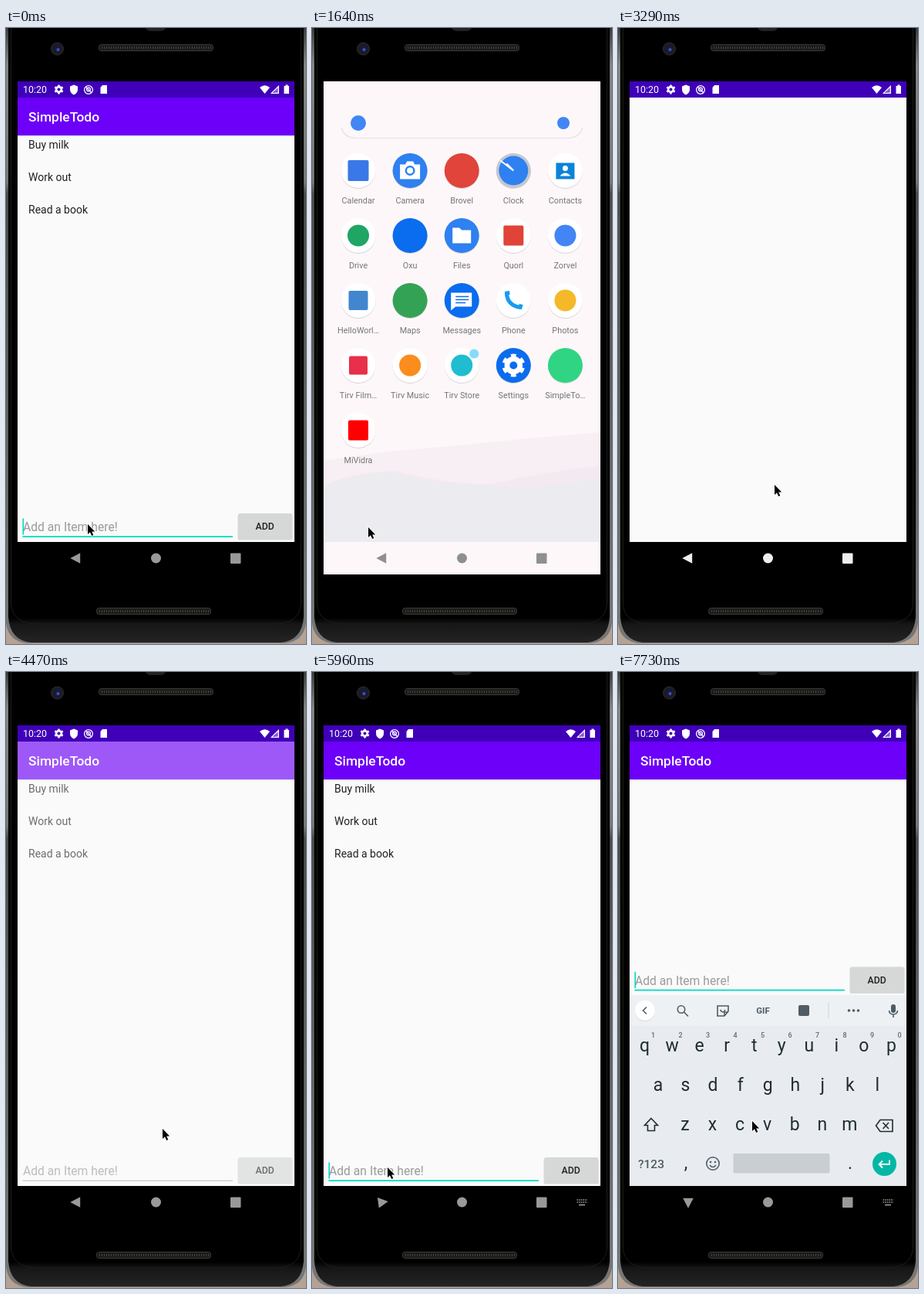
An HTML page that plays this animation: 389 by 797 pixels, repeating every 8 s.

```html
<!DOCTYPE html>
<html lang="en">
<head>
<meta charset="utf-8">
<title>Todo app on a phone</title>
<style>
html, body { margin: 0; width: 100%; height: 100%; overflow: hidden; background: #000; }
svg { display: block; width: 389px; height: 797px; font-family: Roboto, sans-serif; }
.mid { text-anchor: middle; }
.medium { font-weight: 500; }
.line { fill: none; stroke: #4f5c63; stroke-width: 1.6; }
</style>
</head>
<body>
<svg viewBox="0 0 389 797">
  <defs>
    <clipPath id="screen"><path d="M15 69H374V707H15Z"/></clipPath>
    <linearGradient id="edge" x2="0" y2="1">
      <stop stop-color="#3a3a3a"/><stop offset=".06" stop-color="#858585"/>
      <stop offset=".25" stop-color="#777"/><stop offset=".27" stop-color="#4a4a4a"/>
      <stop offset="1" stop-color="#777"/>
    </linearGradient>
    <linearGradient id="lip" x2="0" y2="1">
      <stop offset=".96" stop-color="#000"/><stop offset=".97" stop-color="#161616"/><stop offset="1" stop-color="#242424"/>
    </linearGradient>
  </defs>

  <g id="phone">
    <path fill="#b5a293" d="M0 740H389V797H0Z"/>
    <path fill="url(#edge)" d="M0 0H389V770Q386 794 361 796H28Q3 794 0 770Z"/>
    <path fill="url(#lip)" d="M3 0H386V762Q384 792 357 795H32Q5 792 3 762Z"/>
    <path fill="none" stroke="#1d1d1d" d="M6.500 0V745Q8 771 42 771H347Q381 771 382.500 745V0"/>
    <path fill="#222" d="M181 0H207Q205 4 200 4H188Q183 4 181 0Z"/>
    <g fill="#1b1b1a" stroke="#3b3a36">
      <rect x="120.500" y="21.500" width="148" height="8" rx="3"/>
      <rect x="117.500" y="750.500" width="148" height="8" rx="3"/>
    </g>
    <path stroke="#45443f" stroke-width="3" stroke-dasharray="1 2" d="M124 25.500H266M121 754.500H263"/>
    <circle cx="66.500" cy="27" r="8" fill="#1c1c20" stroke="#2d2d30"/>
    <circle cx="67" cy="27" r="4.500" fill="#151a45"/>
    <circle cx="67.500" cy="28" r="2" fill="#3d56b0"/>
  </g>

  <g clip-path="url(#screen)">
    <g id="launcher">
      <path fill="#fdf7f9" d="M15 69H374V707H15Z"/>
      <path fill="#f7eff3" d="M15 560L90 549 180 541 260 533 374 523V665H15Z"/>
      <path fill="#f2eaf0" d="M15 592Q50 575 110 573Q170 590 230 590Q300 575 374 566V665H15Z"/>
      <path fill="#ecebf0" d="M15 592Q60 576 105 575Q160 592 220 591Q290 600 374 582V665H15Z"/>
      <path fill="none" stroke="#e6e0e3" stroke-width="1.200" d="M38 129Q42 142 57 142.500H332Q347 142 351 129"/>
      <circle cx="60" cy="123" r="10" fill="#4285f4"/>
      <circle cx="326" cy="123" r="8" fill="#4285f4"/>
    </g>

    <g id="win">
      <path fill="#fafafa" d="M15 69H374V707H15Z"/>
      <g id="content">
        <g id="list" font-size="14" fill="#212121">
          <text x="29" y="156">Buy milk</text>
          <text x="29" y="198">Work out</text>
          <text x="29" y="239.500">Read a book</text>
        </g>
        <g id="entry">
          <text x="22" y="651" font-size="15.700" fill="#9b9b9b">Add an Item here!</text>
          <path id="rule" d="M21.500 658.200H294"/>
          <path id="caret" stroke="#03dac5" stroke-width="1.700" d="M22.300 634.500V655.500"/>
          <rect x="300.500" y="629.500" width="71" height="33" rx="2" fill="#000" opacity=".14"/>
          <rect x="301" y="628" width="70" height="33" rx="2" fill="#d6d7d7"/>
          <text class="mid medium" x="335.700" y="649" font-size="12.300" fill="#212121">ADD</text>
        </g>
        <path fill="#000" opacity=".1" d="M15 139H374V140.500H15Z"/>
        <path fill="#6c00f8" d="M15 90H374V139H15Z"/>
      </g>
      <text id="title" class="medium" x="29" y="121" font-size="17.400" fill="#fff">SimpleTodo</text>
      <g id="keys">
        <path fill="#e8ecf0" d="M15 418H374V707H15Z"/>
        <path fill="#eef1f4" d="M15 418H374V458H15Z"/>
        <circle cx="35" cy="439" r="13" fill="#d5dadd"/>
        <circle cx="35" cy="438" r="13" fill="#fff"/>
        <g class="line">
          <path d="M37 433.500L32.500 438 37 442.500"/>
          <circle cx="82" cy="436.500" r="4.700"/><path d="M85.500 440L91 445.500"/>
          <path d="M129 432H143V439L138 445H129ZM138 445V440H143M132.500 437Q136 443 139 437"/>
          <path stroke="#cdd3d7" stroke-width="1" d="M273 428V448"/>
          <path d="M351.500 438Q352 443 357 443Q362 443 362.500 438M357 443V447"/>
          <path stroke="#202c33" d="M43 577.500L51.500 586.500H47.500V593.500H38.500V586.500H34.500Z"/>
          <path stroke="#202c33" d="M334.500 587L340 579.500H356V594.500H340ZM343.500 583L351 591M351 583L343.500 591"/>
          <circle cx="123" cy="636" r="8.200"/><path d="M119 638Q123 643 127 638"/>
        </g>
        <g fill="#4f5c63">
          <rect x="234" y="431" width="14" height="14" rx="2"/>
          <rect x="354" y="430" width="6" height="11" rx="3"/>
          <circle cx="299.500" cy="438" r="1.800"/><circle cx="305.500" cy="438" r="1.800"/><circle cx="311.500" cy="438" r="1.800"/>
          <circle cx="120" cy="634" r="1.300"/><circle cx="126" cy="634" r="1.300"/>
          <text class="mid" x="188" y="442" font-size="11.500" font-weight="700">GIF</text>
          <text class="medium" x="26" y="642" font-size="15.500">?123</text>
        </g>
        <rect x="149.500" y="623" width="125" height="25.500" rx="2" fill="#c9ced2"/>
        <circle cx="345.500" cy="636.500" r="15.500" fill="#00b8a5"/>
        <path fill="none" stroke="#fff" stroke-width="1.800" d="M352 631.500V637H339M343 632.500L338.500 637 343 641.500"/>
      </g>
      <path d="M15 665H374V707H15Z"/>
      <path fill="#3f00b8" d="M15 69H374V90H15Z"/>
      <g id="status" fill="#fff">
        <text x="22" y="84" font-size="12.400">10:20</text>
        <path d="M88 73.500L93 75.500V79.500Q93 84 88 86.500Q83 84 83 79.500V75.500Z"/>
        <g fill="none" stroke="#fff" stroke-width="1.300">
          <circle cx="107" cy="80" r="5.400"/><circle cx="107" cy="79.500" r="2.400"/><path d="M104 76.500L111 84"/>
          <path d="M344.500 84.300H353.300V75.500Z"/>
        </g>
        <path d="M125 74H131V85H122.500V77Z"/>
        <path d="M329 77Q335.500 71.500 342 77L335.500 85Z"/>
        <path d="M348 84.500V81L353.500 75.500V84.500Z" opacity=".35"/>
        <path d="M360.500 75H362.500V73.500H365.500V75H367V85H360.500Z"/>
      </g>
    </g>

    <g id="nav">
      <path id="back" d="M83.300 686L96.200 679.200V692.800Z"/>
      <circle cx="194.500" cy="686" r="6.500"/>
      <rect x="291" y="679.500" width="13.500" height="13.500" rx="1"/>
      <g id="imeKey" fill="none" stroke="#999" stroke-width="1.600">
        <path stroke-dasharray="1.600 1" d="M343.500 683H357M343.500 686H357"/><path d="M346 689.500H354"/>
      </g>
    </g>
  </g>
  <g id="mouse">
    <path transform="translate(1 1) scale(.87)" d="M0 0V15L3.400 11.800 6 17.300 8.400 16.200 6 11H10.600Z" stroke="#fff" stroke-width="1.600" paint-order="stroke"/>
  </g>
</svg>
<script>
const $ = id => document.getElementById(id);
const add = (id, markup) => $(id).insertAdjacentHTML('beforeend', markup);
const set = (id, attrs) => { for (const k in attrs) $(id).setAttribute(k, attrs[k]); };

const disc = (r, c) => `<circle r="${r}" fill="${c}"/>`;
const square = (s, c) => `<rect x="${-s / 2}" y="${-s / 2}" width="${s}" height="${s}" rx="2" fill="${c}"/>`;
const shape = (d, c = '#fff') => `<path d="${d}" fill="${c}"/>`;
const stroke = (d, c = '#fff', w = 2) => `<path d="${d}" fill="none" stroke="${c}" stroke-width="${w}"/>`;
const gear = (r, c) => `<g fill="none" stroke="${c}"><circle r="${r * .56}" stroke-width="${r * .45}"/>
  <circle r="${r * .83}" stroke-width="${r * .34}" pathLength="12" stroke-dasharray="1 1" stroke-dashoffset="-.5"/></g>`;
const white = '#fff', blue = '#2f80f0', deep = '#0a6cee';

// label, tile colour, drawing on the tile
const apps = [
  ['Calendar', white, square(27, '#3b78e7')],
  ['Camera', blue, shape('M-13 -8H-6L-4 -12H4L6 -8H13V11H-13Z') + disc(6.5, blue) + disc(4, white)],
  ['Brovel', '#e0443a', ''],
  ['Clock', '#c3c8ce', disc(19, blue) + stroke('M-17 -13L0 0M-9 -9L0 0')],
  ['Contacts', white, shape('M-12 -10H12V11H-12Z', '#0b83d9') + `<g fill="#fff"><circle cy="-3" r="3.5"/><path d="M-7 7Q0 -1 7 7Z"/></g>`],
  ['Drive', white, disc(14, '#20a565')],
  ['Oxu', deep, ''],
  ['Files', blue, shape('M-12 -10H-3L0 -7H12V10H-12Z')],
  ['Quorl', white, square(26, '#e04438')],
  ['Zorvel', white, disc(14, '#4285f4')],
  ['HelloWorl…', white, square(25, '#4286d0')],
  ['Maps', '#34a255', ''],
  ['Messages', deep, shape('M-14 -10H13V8H-8L-14 13Z') + stroke('M-8 -5H9M-8 -1H9M-8 3H5', deep, 1.6)],
  ['Phone', white, stroke('M-9 -10Q-8 7 9 9', '#1a9bf0', 5) + stroke('M-11 -9L-5 -10M8 11L10 5', '#1a9bf0', 5)],
  ['Photos', white, disc(14, '#f4b929')],
  ['Tirv Film…', white, square(24, '#e8304a')],
  ['Tirv Music', white, disc(14, '#fb8c1e')],
  ['Tirv Store', white, disc(14, '#20bcd0') + `<circle cx="16" cy="-15" r="6" fill="#83dcfb"/>`],
  ['Settings', deep, gear(15, white)],
  ['SimpleTo…', '#2fd583', ''],
  ['MiVidra', white, square(26, '#f00')],
];
apps.forEach(([name, tile, art], i) => {
  const x = 60 + i % 5 * 67.1, y = 184.5 + Math.floor(i / 5) * 84;
  add('launcher', `<g transform="translate(${x} ${y})"><circle cy="1" r="22.5" fill="#d9d3d6"/>
    ${disc(22.5, tile)}${art}<text class="mid" y="42.500" font-size="10.8" fill="#757575">${name}</text></g>`);
});

add('status', `<g transform="translate(68.5 79.5)">${gear(6, white)}</g>`);

const letters = (row, x, y) => [...row].forEach((c, i) =>
  add('keys', `<text class="mid" x="${x + i * 35.55}" y="${y}" font-size="23" fill="#202c33">${c}</text>`));
letters('qwertyuiop', 34.5, 491);
letters('asdfghjkl', 52, 542);
letters('zxcvbnm', 87, 593);
letters(',', 88, 643);
letters('.', 301, 643);
[...'1234567890'].forEach((c, i) =>
  add('keys', `<text class="mid medium" x="${45.5 + i * 35.5}" y="473" font-size="9" fill="#5f6b72">${c}</text>`));

// Linear keyframes: [tick, value, value...]
function track(keys, n) {
  let i = 0;
  while (i < keys.length - 1 && keys[i + 1][0] <= n) i++;
  const a = keys[i], b = keys[i + 1] || a;
  const k = b === a ? 0 : Math.max(0, (n - a[0]) / (b[0] - a[0]));
  return a.slice(1).map((v, j) => v + (b[j + 1] - v) * k);
}
const mousePath = [[0, 105, 641], [1, 72, 645], [14, 72, 645], [18, 114, 645], [20, 160, 618], [21, 160, 618],
  [22, 202, 590], [34, 202, 590], [37, 97, 640], [44, 97, 640], [45, 140, 612], [46, 173, 580]];
// window scale and opacity
const windowPath = [[5, 1, 1], [6, .99, .92], [7, .97, .7], [8, .95, .38], [9, .93, .12], [10, .92, 0],
  [15, .84, 0], [16, .86, .25], [17, .9, .6], [18, .939, .92], [19, .98, 1], [20, 1, 1]];
const grey = v => { v = Math.round(v); return `rgb(${v},${v},${v})`; };

function draw(n) {
  const [scale, alpha] = track(windowPath, n);
  const focus = n < 16 || n >= 38, typing = n >= 42;
  const on = n < 1 || (n >= 4 && n < 7) || (n >= 38 && n < 42) || (n >= 45 && n < 48) || n >= 52;
  const empty = n >= 16 && n < 30;
  const show = flag => ({ opacity: flag ? 1 : 0 });

  set('win', { opacity: alpha, transform: `translate(194.5 388) scale(${scale}) translate(-194.5 -388)` });
  set('status', show(n < 8 || n >= 20));
  set('content', { opacity: empty ? 0 : n === 30 ? .65 : 1 });
  set('title', show(!empty));
  set('list', show(!typing));
  set('entry', { transform: `translate(0 ${typing ? -246.5 : 0})` });
  set('rule', focus ? { stroke: '#03dac5', 'stroke-width': 1.8 } : { stroke: '#9b9b9b', 'stroke-width': 1 });
  set('caret', show(on));
  set('keys', { ...show(n >= 41), transform: `translate(0 ${n === 41 ? 90 : 0})` });

  const tone = n >= 8 && n < 16 ? 143 : n < 8 ? 153 : track([[16, 255], [21, 250], [22, 238], [28, 153]], n)[0];
  set('nav', { fill: grey(tone) });
  const [turn] = track([[39, 0], [40, 172], [41, 255], [42, 270]], n);
  set('back', { transform: `rotate(${turn} 91 686)` });
  set('imeKey', show(n >= 39));
  set('mouse', { transform: `translate(${track(mousePath, n)})` });
}

function loop() {
  draw(Math.floor(performance.now() % 8000 / 148.6 + .02));
  requestAnimationFrame(loop);
}
loop();
</script>
</body>
</html>
```
